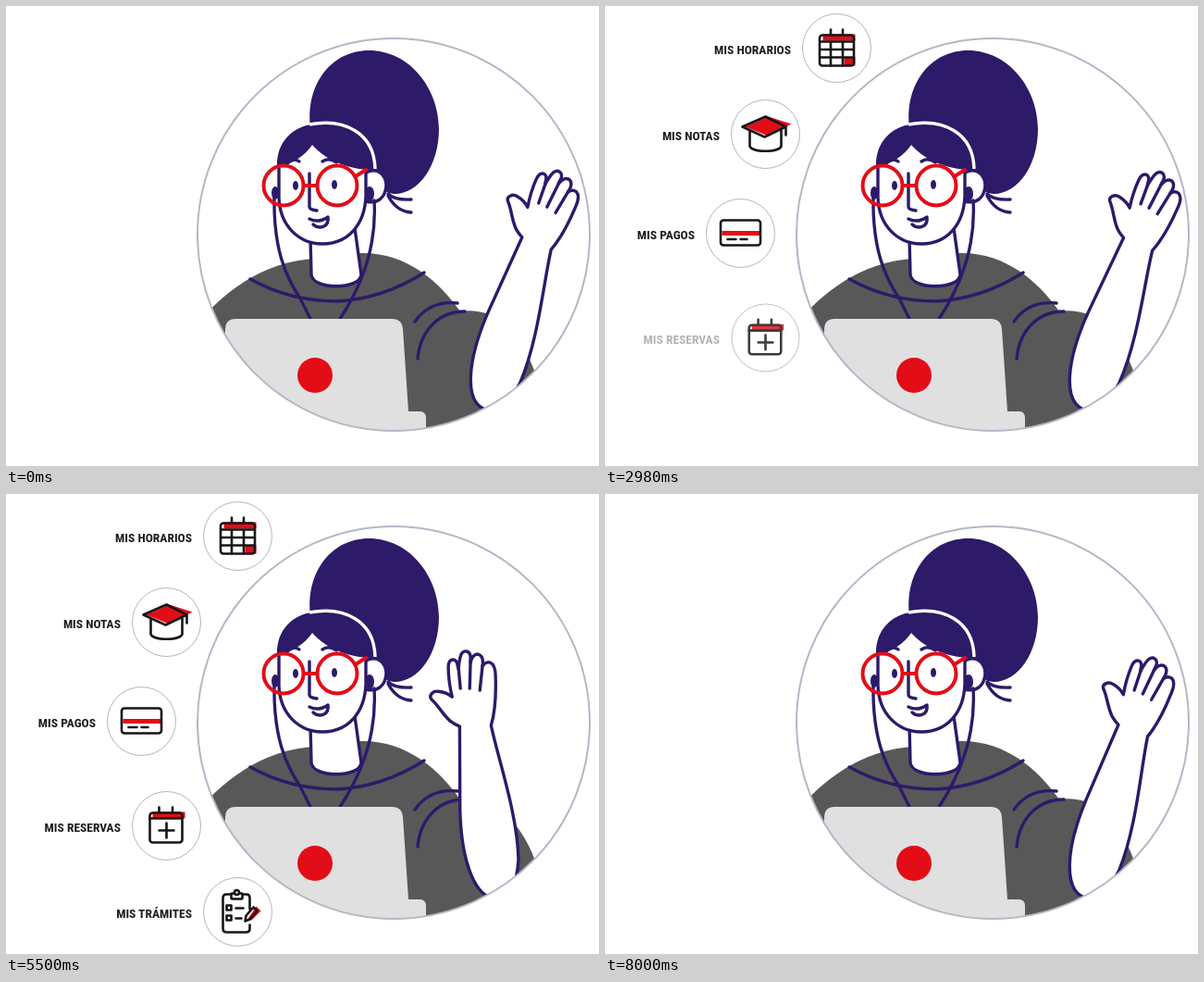
An HTML page that plays this animation: 641x497 px, repeating every 8080 ms.

```html
<!DOCTYPE html>
<html lang="es">
<head>
<meta charset="utf-8">
<title>Mis servicios</title>
<style>
html, body { margin: 0; width: 100%; height: 100%; overflow: hidden; background: #fff; }
svg { display: block; width: 641px; height: 497px; }
.ink { fill: none; stroke: #2d1a69; stroke-width: 3.4; stroke-linecap: round; stroke-linejoin: round; }
.white { fill: #fff; }
.hair { fill: #2d1a69; }
.red { fill: #e30d18; }
.frames { fill: none; stroke: #e30d18; stroke-width: 4; stroke-linecap: round; }
.sweater { fill: #585858; }
.line { fill: none; stroke: #161616; stroke-width: 2.6; stroke-linecap: round; stroke-linejoin: round; }
.ring { fill: #fff; stroke: #b4b4b4; }
text { font-family: "Roboto Condensed", "Noto Sans", "Liberation Sans", sans-serif; font-stretch: extra-condensed;
  font-weight: 700; font-size: 17px; text-anchor: end; fill: #1c1c1c; }
</style>
</head>
<body>
<svg viewBox="0 0 641 497">
  <defs>
    <clipPath id="stage"><circle cx="419" cy="247" r="212"/></clipPath>
  </defs>

  <g clip-path="url(#stage)">
    <path class="hair" d="M329 130C324 82 354 48 392 48C437 48 468 90 468 133C468 172 446 204 419 203Q408 202 398 190L380 150Z"/>
    <path class="ink" stroke-width="3" d="M413 203Q420 210 438 209M413 205Q422 222 438 223"/>

    <path class="sweater" d="M205 345C245 297 290 275 335 273L384 267C432 266 468 297 491 330Q506 328 519 332C548 346 565 374 574 402L560 470H205Z"/>
    <path class="ink" d="M264 295C298 314 333 319 358 319C396 317 427 304 452 288M442 341Q458 318 488 321M445 381C448 350 468 330 496 330"/>

    <path class="ink white" style="fill:#fff" d="M329 250L330 290C331 307 383 307 384 290L377 240"/>
    <path class="ink" style="fill:#fff" d="M389 180C403 173 411 184 411 194C410 208 401 214 389 211"/>
    <path class="ink" style="fill:#fff" d="M295 168V207C296 238 317 257 342 257C370 257 388 236 389 205V170"/>
    <path class="hair" d="M293 174C292 145 312 130 331 128C366 124 394 140 399 177L390 177Q351 173 331 150Q319 168 293 174Z"/>
    <path d="M328 128C366 121 398 137 399 176" fill="none" stroke="#fff" stroke-width="3.4"/>

    <path class="ink" d="M290 206C289 262 302 292 318 316L329 338M398 210C401 258 386 300 361 338"/>
    <ellipse class="hair" cx="291" cy="202" rx="4" ry="7"/>
    <ellipse class="hair" cx="393" cy="203" rx="5" ry="8"/>

    <path class="ink" d="M304 170Q311 163 317 168M342 168Q349 163 357 169"/>
    <path class="ink" d="M328 181V217Q328 220 336 221M328 230Q338 235 348 228Q349 238 340 239Q335 239 332 236"/>
    <ellipse class="hair" cx="313" cy="194" rx="3" ry="5"/>
    <ellipse class="hair" cx="355" cy="193" rx="3" ry="5"/>
    <g class="frames">
      <circle cx="300" cy="194" r="21.5"/>
      <circle cx="358" cy="194" r="21.5"/>
      <path d="M322 194H336M378 184L389 177"/>
    </g>

    <path fill="#e0e0e1" d="M237 470V350Q237 338 248 338H417Q428 338 429 349L435 438H447Q454 438 454 445V470Z"/>
    <circle class="red" cx="334" cy="399" r="19"/>

    <g id="arm">
      <path class="ink" style="fill:#fff" d="M491 251Q486 249 482 246C474 240 468 228 461 222C457 218 462 212 468 213Q477 214 483 219Q479 202 479 187C479 177 488 176 489 185L490 189Q491 177 493 173C496 168 502 169 503 175V182Q505 173 511 173C516 174 517 179 516 186Q519 181 524 182C529 184 530 190 530 197Q531 230 525 250C532 285 553 345 554 395C552 425 543 437 530 437C508 437 492 400 491 340Z"/>
      <path class="ink" d="M490 188L492 210M503 180L502 210M516 185L513 212"/>
    </g>
  </g>
  <circle cx="419" cy="247" r="212" fill="none" stroke="#b7b6c6" stroke-width="2"/>
  <g id="menu"></g>
</svg>

<script>
const LOOP = 8080;
const WAVE = 1592, SWING_LEFT = 830;
const FIRST_ITEM = 180, ITEM_GAP = 780;
const FADE_OUT = 6930, FADE_LENGTH = 470;

const line = d => `<path class="line" d="${d}"/>`;
const box = (x, y, w, h, r = 3) => `<rect class="line" x="${x}" y="${y}" width="${w}" height="${h}" rx="${r}"/>`;
const red = d => `<path class="red" d="${d}"/>`;

const items = [
  { label: 'MIS HORARIOS', x: 250.5, y: 45.5, end: 201, icon:
    red('M-15-15H20V-8H-15ZM8 9.5H20V19H8Z') + box(-18.5, -14, 37, 33) +
    line('M-6.5-20V-15M6.5-20V-15M-18-7H18M-18 1.5H18M-18 10H18M-6.5-7V19M6.5-7V19') },
  { label: 'MIS NOTAS', x: 173.5, y: 138.5, end: 124, icon:
    red('M-22-8L3-19L28-11L3 2Z') +
    line('M-25-8L0-19L22-8L-1 3ZM-17-3V13C-14 20 14 20 17 13V-4M22-8V1') },
  { label: 'MIS PAGOS', x: 146.5, y: 245.5, end: 97, icon:
    red('M-20-2.5H22V2.5H-20Z') + box(-21.5, -14, 43, 27) + line('M-14 6.5H-5M0 6.5H7') },
  { label: 'MIS RESERVAS', x: 173.5, y: 358.5, end: 124, icon:
    red('M-15-15H20V-8H-15Z') + box(-18, -14, 35, 32) +
    line('M-8-20V-15M6.5-20V-15M-18-8H17M-8 5H8M0-3V13') },
  { label: 'MIS TRÁMITES', x: 250.5, y: 451.5, end: 201, icon:
    line('M13-3V-15Q13-19 9-19H-12Q-16-19-16-15V18Q-16 22-12 22H9Q13 22 13 18V14') +
    '<rect class="line" style="fill:#fff" x="-7" y="-20" width="12" height="6" rx="1"/>' +
    '<circle class="line" style="fill:#fff" cx="-1" cy="-21" r="2.5"/>' +
    box(-12, -7, 5, 5, 0) + box(-12, 4, 5, 5, 0) + line('M-2-4H6M-2 7H4') +
    red('M10 9L20-6L25-1L15 9Z') + line('M8 10L9 4L17-5L21-1L13 8Z') }
];

const menu = document.getElementById('menu');
const arm = document.getElementById('arm');
menu.innerHTML = items.map(({ label, x, y, end, icon }) =>
  `<g><text x="${end}" y="${y + 6}">${label}</text>` +
  `<g><circle class="ring" r="37"/>${icon}</g></g>`).join('');
items.forEach((item, i) => [item.text, item.badge] = menu.children[i].children);

// One type size for every label, bounded by the space beside the badges.
const fontSize = Math.min(17, 17 * 83 / items[0].text.getComputedTextLength());
items.forEach(item => item.text.style.fontSize = fontSize + 'px');

const clamp = v => Math.max(0, Math.min(1, v));
const ease = v => (1 - Math.cos(Math.PI * v)) / 2;
const spring = t => 1 - Math.exp(-t * 0.0086) * Math.cos(Math.PI * t / 205);

function armAngle(t) {
  const u = (t + 130) % WAVE;
  const lean = u < SWING_LEFT ? 1 - ease(u / SWING_LEFT) : ease((u - SWING_LEFT) / (WAVE - SWING_LEFT));
  return -0.3 + 26.3 * lean;
}

function draw(t) {
  arm.setAttribute('transform', `rotate(${armAngle(t)} 527 405)`);
  menu.setAttribute('opacity', 1 - clamp((t - FADE_OUT) / FADE_LENGTH));
  items.forEach(({ x, y, text, badge }, i) => {
    const age = Math.max(0, t - FIRST_ITEM - i * ITEM_GAP);
    badge.setAttribute('transform', `translate(${x} ${y}) scale(${spring(age)})`);
    badge.setAttribute('opacity', clamp(age / 550));
    text.setAttribute('opacity', clamp((age - 385) / 230));
  });
}

const start = performance.now();
function tick() {
  draw((performance.now() - start) % LOOP);
  requestAnimationFrame(tick);
}
tick();
</script>
</body>
</html>
```
